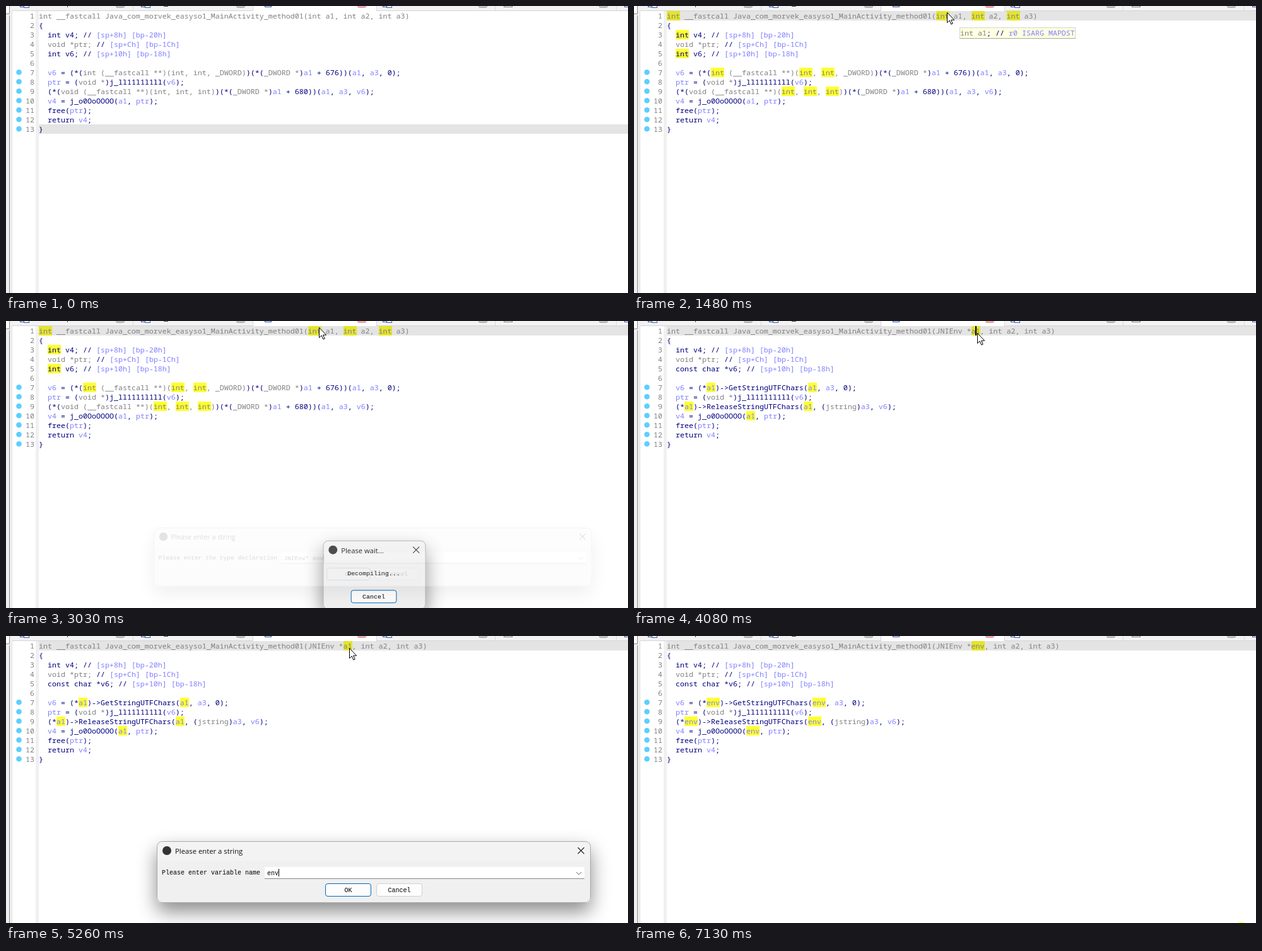
An HTML page that plays this animation: 986 px wide and 456 px high, repeating every 7.19 s.

```html
<!DOCTYPE html>
<html lang="en">
<head>
<meta charset="utf-8">
<title>Retyping a variable</title>
<style>
  html, body { margin: 0; width: 100%; height: 100%; overflow: hidden; background: #fff; }
  svg { display: block; }
  text { white-space: pre; }
  .code { font: 11.667px "Noto Sans Mono", "DejaVu Sans Mono", monospace; }
  .title { font: 11.3px "Open Sans", "Noto Sans", sans-serif; }
  .form { font: 10px "Liberation Mono", monospace; }
</style>
</head>
<body>
<svg width="986" height="456" viewBox="0 0 986 456">
  <defs>
    <filter id="shadow" x="-40%" y="-70%" width="180%" height="260%">
      <feDropShadow dx="0" dy="14" stdDeviation="15" flood-color="#000" flood-opacity=".45"/>
    </filter>
  </defs>
  <g id="chrome"></g>
  <g id="editor"></g>
  <g id="overlay"></g>
</svg>
<script>
const LOOP = 7190;
const NAVY = '#000080', GREY = '#808080', PURPLE = '#8080ff', PANEL = '#f0f0f0';
const LEFT = 52, TOP = 8, ROW = 15, CHAR = 7;

const clamp = v => Math.max(0, Math.min(1, v));
const rect = (x, y, w, h, fill, extra = '') =>
  `<rect x="${x}" y="${y}" width="${w}" height="${h}" fill="${fill}" ${extra}/>`;
const path = (d, stroke, width = 1, fill = 'none') =>
  `<path d="${d}" stroke="${stroke}" stroke-width="${width}" fill="${fill}"/>`;
const text = (x, y, cls, fill, body, anchor = 'start') =>
  `<text x="${x}" y="${y}" class="${cls}" fill="${fill}" text-anchor="${anchor}">${body}</text>`;
const paint = (color, body) => `<tspan fill="${color}">${body}</tspan>`;

// Progress from 0 to 1 that advances in even discrete steps.
const stepped = (t, from, to, steps) =>
  clamp(Math.floor((t - from) / (to - from) * (steps - 1) + 1e-6) / (steps - 1));

function chrome() {
  let out = rect(0, 0, 986, 7, '#f3f3f3') + rect(392, 0, 195, 8, '#fff');
  out += path('M10 7.5H392M587 7.5H986', '#d4d4d4');
  for (const x of [201.5, 391.5, 587.5, 775.5, 967.5]) out += path(`M${x} 0V7`, '#dadada');
  [174, 365, 557, 749, 940].forEach((x, i) => {
    const [fill, edge] = i === 2 ? ['#f0a8ae', '#d8959b'] : ['#c4c4c8', '#a0a0a6'];
    out += rect(x + .5, -5.5, 13, 8, fill, `rx="2" stroke="${edge}"`);
  });
  for (const x of [22, 214, 597]) {
    out += rect(x + .5, -4.5, 8, 6, '#fff', 'stroke="#3050b0"') +
      rect(x + 6.5, -4.5, 8, 7, '#fff', 'stroke="#4058a8"');
  }
  out += rect(410.5, -4.5, 10, 6, '#fff', 'stroke="#3050b0"') +
    rect(789.5, -4.5, 13, 6, '#fff', 'stroke="#777"') + rect(980.5, -4.5, 10, 6, '#fff', 'stroke="#3050b0"');
  out += path('M97.5 0V2M250 .5h7', '#444');

  out += rect(0, 0, 10, 456, PANEL) + rect(0, 0, 5, 12, '#fff');
  out += path('M0 12.5H5.5V0M5.5 15V456', '#8c8c8c') + path('M9.5 8V456', '#e2e2e2');
  out += rect(47, 8, 5, 448, PANEL);
  for (let i = 0; i < 13; i++) {
    out += text(45, 20 + i * ROW, 'code', GREY, i + 1, 'end');
    if (i > 5) out += `<circle cx="20.5" cy="${15.2 + i * ROW}" r="4.3" fill="#5ccfff"/>`;
  }
  return out;
}

function listing(retyped, arg) {
  const pick = (before, after) => retyped ? after : before;
  return [
    `int __fastcall Java_com_morvek_easyso1_MainActivity_method01(${pick('int ', 'JNIEnv *')}${arg}, int a2, int a3)`,
    '{',
    '  int v4; // [sp+8h] [bp-20h]',
    '  void *ptr; // [sp+Ch] [bp-1Ch]',
    `  ${pick('int ', 'const char *')}v6; // [sp+10h] [bp-18h]`,
    '',
    pick('  v6 = (*(int (__fastcall **)(int, int, _DWORD))(*(_DWORD *)a1 + 676))(a1, a3, 0);',
      `  v6 = (*${arg})->GetStringUTFChars(${arg}, a3, 0);`),
    '  ptr = (void *)j_ll11l1l1ll(v6);',
    pick('  (*(void (__fastcall **)(int, int, int))(*(_DWORD *)a1 + 680))(a1, a3, v6);',
      `  (*${arg})->ReleaseStringUTFChars(${arg}, (jstring)a3, v6);`),
    `  v4 = j_o0OoOOOO(${arg}, ptr);`,
    '  free(ptr);',
    '  return v4;',
    '}'
  ];
}

const TYPES = /(?:int|void) \(__fastcall \*\*\)\([^)]*\)|_DWORD \*|void \*|jstring/;
const LOCALS = /\b(?:[av]\d|ptr|env)\b/;
const BODY = new RegExp(`(${TYPES.source})|${LOCALS.source}`, 'g');

function colored(line, row) {
  if (row === 0) return line;
  if (row < 5) {
    return line.replace(/void \*ptr;|\[.*\]/g, m => paint(m[0] === '[' ? PURPLE : GREY, m));
  }
  return line.replace(BODY, (m, type) => paint(type ? GREY : PURPLE, m));
}

function editor(lines, word, currentRow) {
  let marks = '', body = '';
  lines.forEach((line, row) => {
    const y = TOP + row * ROW;
    if (word) {
      for (const m of line.matchAll(new RegExp(`\\b${word}\\b`, 'g'))) {
        marks += rect(LEFT + m.index * CHAR, y, word.length * CHAR, ROW, '#ffff32');
      }
    }
    body += text(LEFT, y + 12, 'code', row ? NAVY : GREY, colored(line, row));
  });
  return marks + rect(LEFT, TOP + currentRow * ROW, 934, ROW, '#000', 'opacity=".105"') + body;
}

function tooltip(x, y, declaration) {
  const rest = ' r0 ISARG MAPDST';
  const w = (declaration.length + 3 + rest.length + 1) * CHAR + 2;
  return rect(x + .5, y + .5, w - 1, 17, '#ffffe1', 'stroke="#d6d6c4"') +
    path(`M${x} ${y + 17.5}h${w}`, '#a8a8a0') +
    text(x + 1, y + 13, 'code', GREY, declaration + paint(NAVY, '; //') + paint(PURPLE, rest));
}

function button(cx, y, label, primary) {
  return rect(cx - 36, y + .5, 72, 20, '#fdfdfd', `rx="3.5" stroke="${primary ? '#0067b8' : '#d0d0d0'}"`) +
    text(cx, y + 14, 'form', '#000', label, 'middle');
}

function dialogFrame(x, y, w, h, title, content, { scale, opacity }) {
  const cx = x + w / 2, cy = y + h / 2, close = x + w - 15.5;
  return `<g opacity="${opacity}" transform="translate(${cx} ${cy}) scale(${scale}) translate(${-cx} ${-cy})">` +
    rect(x, y, w, h, PANEL, 'rx="8" filter="url(#shadow)"') +
    `<path d="M${x} ${y + 31}v-23a8 8 0 0 1 8-8h${w - 16}a8 8 0 0 1 8 8v23z" fill="#f3f3f3"/>` +
    rect(x + .5, y + .5, w - 1, h - 1, 'none', 'rx="8" stroke="#a9a9a9"') +
    `<circle cx="${x + 16}" cy="${y + 15}" r="7" fill="#333"/>` +
    text(x + 29, y + 20, 'title', '#111', title) +
    path(`M${close - 5} ${y + 10}l10 10m0 -10l-10 10`, '#222', 1.1) + content + '</g>';
}

function promptDialog(x, w, label, value, selected, pose) {
  const y = 326, cx = x + w / 2, labelX = x + 8;
  const fieldX = labelX + label.length * 6 + 7, fieldW = x + w - 10 - fieldX;
  const valueX = fieldX + 4, valueW = value.length * 6, right = x + w - 19;
  const content = text(labelX, y + 53, 'form', '#000', label) +
    rect(fieldX, y + 41, fieldW, 19, '#fff') +
    path(`M${fieldX} ${y + 59.5}h${fieldW}`, '#868686') +
    (selected ? rect(valueX, y + 43, valueW + 1, 14, '#0078d7')
      : path(`M${valueX + valueW + .5} ${y + 44}v12`, '#000')) +
    text(valueX, y + 54, 'form', selected ? '#fff' : '#000', value) +
    path(`M${right - 4} ${y + 49}l4 4l4 -4`, '#666') +
    button(cx - 40.5, y + 67, 'OK', true) + button(cx + 40.5, y + 67, 'Cancel');
  return dialogFrame(x, y, w, 98, 'Please enter a string', content, pose);
}

function waitDialog(pose) {
  const content = text(541, 404, 'form', '#000', 'Decompiling...') + button(583, 427.5, 'Cancel', true);
  return dialogFrame(502, 348.5, 164, 110, 'Please wait...', content, pose);
}

// Windows grow and fade in, then shrink slightly and fade out.
function windowPose(t, opens, closes) {
  if (t < opens) return null;
  if (t < closes) {
    const p = clamp((t - opens) / 210);
    return { scale: 1 - .085 * (1 - p) ** 2, opacity: clamp(.2 + p * 2.4) };
  }
  const age = 70 * Math.floor((t - closes) / 70) + 25;
  return age > 190 ? null : { scale: 1 - .05 * age / 165, opacity: 1 - age / 190 };
}

const moves = [
  { from: 70, to: 290, steps: 4, points: [[798, 351], [645, 198], [496, 53], null] },
  { from: 490, to: 670, steps: 4, points: [[477, 20], [486, 3], [493, 6], [496, 10]] },
  { from: 3410, to: 3900, steps: 8, points: [[496, 10], [508, 0], [530, 6], [544, 19]] },
  { from: 6320, to: 6990, steps: 11, points: [[544, 19], [600, 60], [800, 290], [950, 430], [963, 461]] }
];

function pointer(t) {
  const move = moves.filter(m => t >= m.from).pop();
  if (!move) return '';
  const along = stepped(t, move.from, move.to, move.steps) * (move.points.length - 1);
  const i = Math.floor(along + 1e-6), a = move.points[i];
  if (!a) return '';
  const b = move.points[i + 1] || a;
  const [x, y] = a.map((v, k) => v + (b[k] - v) * (along - i));
  return `<g transform="translate(${x} ${y})">` +
    path('M.5 .5V16.5L4.2 13L6.8 19L9.2 18L6.7 12.2H11.7Z', '#000', 1, '#fff') + '</g>';
}

function scene(t) {
  const retyped = t >= 3080, renamed = t >= 6060;
  const word = t < 810 ? '' : !retyped ? 'int' : t < 3950 ? 'JNIEnv' : renamed ? 'env' : 'a1';
  let over = '';
  if (t >= 810 && t < 1340) over += rect(493, 8, 2, 15, '#000');
  if (t >= 3950 && t < 4550) over += rect(541, 8, 2, 15, '#000');
  if (t >= 1480 && t < 1740) over += tooltip(516, 34, 'int a1');
  if (t >= 4210 && t < 4550) over += tooltip(563, 43, 'JNIEnv *a1');

  const wait = windowPose(t, 2870, 3080);
  const typePose = windowPose(t, 1740, 2870);
  const namePose = windowPose(t, 4730, 5860);
  if (wait) over += waitDialog(wait);
  if (typePose) {
    over += promptDialog(216, 731, 'Please enter the type declaration',
      t < 2210 ? 'int a1' : 'JNIEnv* env', t < 2210, typePose);
  }
  if (namePose) {
    over += promptDialog(239, 688, 'Please enter variable name',
      t < 5260 ? 'a1' : 'env', t < 5260, namePose);
  }
  if (t >= 7130) over += '<circle cx="963" cy="464" r="10" fill="#ffff60"/>';
  return {
    editor: editor(listing(retyped, renamed ? 'env' : 'a1'), word, t < 810 ? 12 : 0),
    overlay: over + pointer(t)
  };
}

const shown = {};
function show(id, markup) {
  if (shown[id] === markup) return;
  shown[id] = markup;
  document.getElementById(id).innerHTML = markup;
}

const start = performance.now();
function frame() {
  const layers = scene((performance.now() - start) % LOOP);
  for (const id in layers) show(id, layers[id]);
  requestAnimationFrame(frame);
}

show('chrome', chrome());
frame();
</script>
</body>
</html>
```
